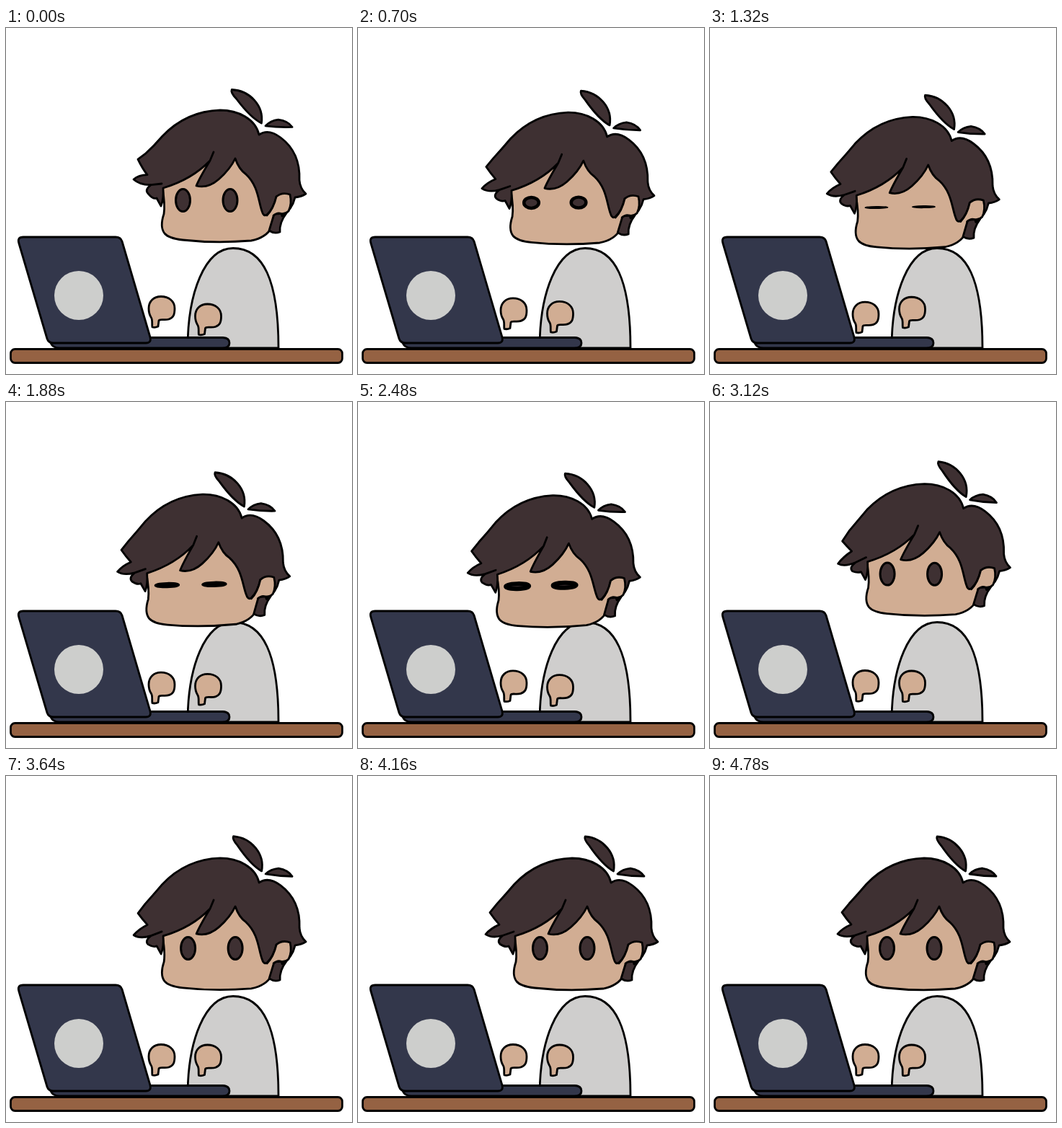
An HTML page that plays this animation: 480x480 px, repeating every 4800 ms.

```html
<!DOCTYPE html>
<html lang="en">
<head>
<meta charset="utf-8">
<title>Dozing at the desk</title>
<style>
  html, body { margin: 0; height: 100%; overflow: hidden; background: #fff; }
  svg { display: block; width: 100vw; height: 100vh; }
  .shape { stroke: #000; stroke-width: 2.8; stroke-linejoin: round; stroke-linecap: round; }
  .skin { fill: #d1ad93; }
  .hair { fill: #3e3032; }
  .navy { fill: #33374b; }
</style>
</head>
<body>
<svg viewBox="0 0 480 480">
  <defs>
    <path id="hand" class="shape skin" d="M198 389C198 379 205 372.500 215 372.500C226 372.500 234 379 234 389C234 398 232 402 226 404C220 406 213 403 212 406L211 414Q207 416 203 415C202 411 204 405 201 401Q198 396 198 389Z"/>
  </defs>

  <path class="shape" fill="#cfcecd" d="M252 444C252 367 276 305.500 315 305.500C357 305.500 378 350 378 444Z"/>
  <rect class="shape" fill="#956243" x="6.5" y="445.5" width="460" height="19" rx="6"/>
  <path class="shape navy" d="M62 437L196 429.500H301Q310 430 310 437Q310 444 300 444H74Q65 444 62 437Z"/>
  <path class="shape navy" d="M24 290H152Q159 290 161 296L200 429Q202 437 194 437H66Q59 437 57 431L18 299Q15 290 24 290Z"/>
  <circle cx="101" cy="371" r="34" fill="#cdcecc"/>

  <g id="head">
    <path class="shape skin" d="M217 222Q221 245 219 258Q213 276 220 285Q226 292 245 294Q290 299 340 295Q361 291 369 276L372 258V170H250Z"/>
    <g id="eyes" class="hair" stroke="#000">
      <ellipse cx="245.5" cy="239"/>
      <ellipse cx="311" cy="239"/>
    </g>
    <path class="shape hair" d="M372 258L365 281Q372 286 380 283Q379 270 389 257Z"/>
    <path id="hair" class="shape hair"/>
    <path class="shape skin" d="M362 260Q371 251 375 234Q383 227 394 231Q397 244 392 254Q387 259 380 257Q376 256 371 260"/>
    <g id="tuft">
      <path class="shape hair" d="M315 84C340 86 359 108 354.500 132C342 125 330 110 321 97Q313 88 315 84Z"/>
      <path class="shape hair" d="M360 136Q367 129 378 128Q391 130 397 139Q378 139 360 136Z"/>
    </g>
  </g>

  <use id="left" href="#hand"/>
  <use id="right" href="#hand"/>
</svg>

<script>
const LOOP = 4800, ASLEEP = 2350, WAKE = 2600, TYPING = 850;
const $ = id => document.getElementById(id);
const set = (el, attrs) => Object.entries(attrs).forEach(([k, v]) => el.setAttribute(k, v));

// Keys are rows of [time, ...values]; values are interpolated linearly.
function track(keys, t) {
  const i = keys.findIndex(key => key[0] > t);
  if (i < 0) return keys[keys.length - 1].slice(1);
  const a = keys[i - 1], b = keys[i], k = (t - a[0]) / (b[0] - a[0]);
  return a.slice(1).map((v, j) => v + (b[j + 1] - v) * k);
}

// rx, ry, outline width
const eyeKeys = [
  [0, 10, 15.5, 3], [700, 10.3, 7.5, 4.5], [1320, 15, 0.5, 3],
  [2480, 16, 3.5, 6], [WAKE, 16, 3.5, 6], [2700, 10, 15.5, 3]
];
const gazeKeys = [[0, 0], [3500, 0], [3600, 7], [4300, 7], [4400, 0]];

// 1 is fully nodded off, 0 is upright; waking up is a damped spring.
function droop(t) {
  if (t < WAKE) return Math.sin(Math.PI / 2 * Math.min(1, t / ASLEEP)) ** 2;
  const u = t - WAKE;
  return Math.exp(-u / 200) * Math.cos(2 * Math.PI * u / 400);
}

function hairLift(t) {
  if (t < WAKE) return 7 * Math.exp(-t / 150);
  const u = t - WAKE;
  return -14 * Math.exp(-u / 450) * Math.min(1, u / 100);
}

const hairPath = q => `M351 148C346 126 322 114 297 114C263 115 238 128 217 150
  Q206 163 193 ${177 - q / 3}L183 ${189 - q}Q189 ${198 - q / 2} 196 ${206 - q / 3}
  Q184 ${211 - q} 177 ${219 - q * 1.3}Q186 ${225 - q} 201 ${221 - q / 2}L216 216
  L201 ${221 - q / 2}Q192 ${228 - q / 2} 197 ${233 - q / 2}Q204 238 209 236L215 247
  Q219 237 218 222Q258 210 283 184L288 172L283 184Q268 209 264 219Q280 223 295 210
  Q311 196 318 181Q323 196 333 203C350 219 350 240 355 254Q357 262 362 259
  Q371 251 375 234L383 261Q397 252 401 235Q410 234 416 230Q408 223 407 211
  C408 187 401 167 381 152Q364 139 351 148Z`;

function draw(t) {
  const p = droop(t), q = hairLift(t);
  set($('head'), { transform: `translate(${-23.2 * p} ${15.7 * p}) rotate(${-1.2 * p} 290 296)` });
  set($('hair'), { d: hairPath(q) });
  set($('tuft'), { transform: `rotate(${-0.3 * q} 355 135)` });

  const [rx, ry, width] = track(eyeKeys, t);
  set($('eyes'), { transform: `translate(${track(gazeKeys, t)[0]})`, 'stroke-width': width });
  for (const eye of $('eyes').children) set(eye, { rx, ry });

  const reach = t < WAKE ? 10 - 0.0016 * t : 0;
  const beat = Math.cos(2 * Math.PI * t / TYPING);
  set($('left'), { y: reach * (1 - beat) / 2 });
  set($('right'), { x: 64.5, y: 0.5 + reach * (1 + beat) / 2 });
}

const start = performance.now();
function tick() {
  draw((performance.now() - start) % LOOP);
  requestAnimationFrame(tick);
}
tick();
</script>
</body>
</html>
```
